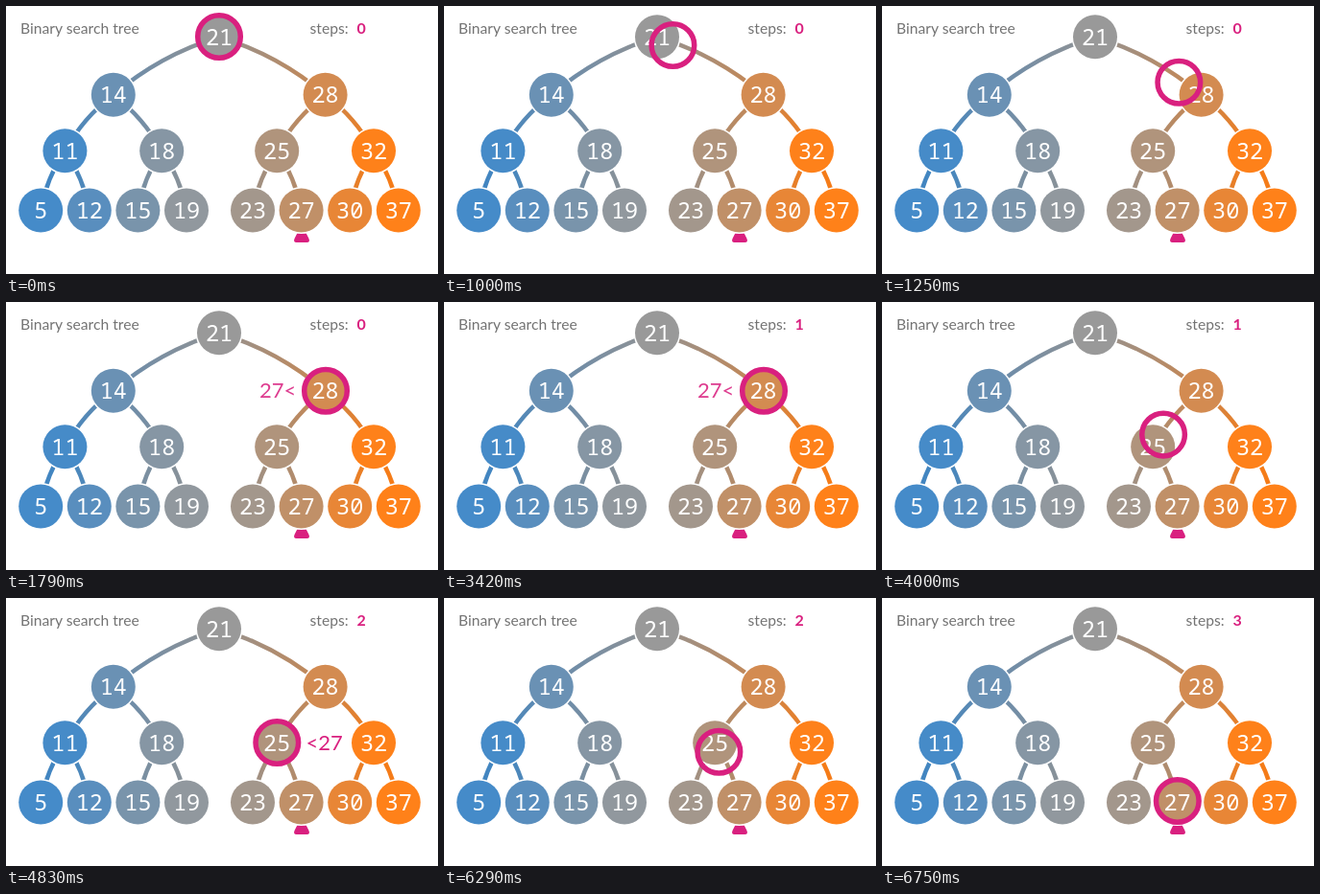
Write an HTML page that moves like this. It is 450x280 px and loops after 8000 ms.

```html
<!DOCTYPE html>
<html lang="en">
<head>
<meta charset="utf-8">
<title>Binary search tree</title>
<style>
  html, body { margin: 0; width: 100%; height: 100%; overflow: hidden; background: #fff; }
  svg { display: block; width: 450px; height: 280px; }
  text { font-family: Lato, sans-serif; }
  .label { font-size: 15.7px; fill: #737373; }
  .count { font-size: 16px; font-weight: 700; fill: #d9207f; }
  .hint { font-size: 22px; fill: #d9207f; }
  .num { font: 23.5px "Noto Sans Mono", monospace; fill: #fff; text-anchor: middle; }
  .ring { fill: none; stroke: #d9207f; stroke-width: 5.5; }
</style>
</head>
<body>
<svg id="stage" viewBox="0 0 450 280">
  <defs id="defs"></defs>
  <text class="label" x="15" y="29">Binary search tree</text>
  <text class="label" x="316.5" y="29">steps:</text>
  <text class="count" id="count" x="365.5" y="29">0</text>
  <g id="edges" fill="none" stroke-width="4.5"></g>
  <path fill="#d9207f" d="M308 231.5Q310 231.5 312 236L315.5 243Q317 247 313.5 247H302.5Q299 247 300.5 243L304 236Q306 231.5 308 231.5Z"/>
  <g id="nodes"></g>
  <text class="hint" id="less" x="264" y="100">27&lt;</text>
  <text class="hint" id="more" x="312.5" y="158.5">&lt;27</text>
  <circle class="ring" id="ring" r="22.3"/>
</svg>
<script>
const $ = id => document.getElementById(id);

function add(parent, tag, attrs, text) {
  const el = document.createElementNS('http://www.w3.org/2000/svg', tag);
  for (const k in attrs) el.setAttribute(k, attrs[k]);
  if (text !== undefined) el.textContent = text;
  $(parent).appendChild(el);
  return el;
}

// Level-order values; children of i are 2i+1 and 2i+2.
const values = [21, 14, 28, 11, 18, 25, 32, 5, 12, 15, 19, 23, 27, 30, 37];
const rowY = [32.3, 92.8, 151.3, 213.5];
const GREY = [153, 153, 153], BLUE = [69, 139, 201], ORANGE = [255, 129, 25];

function colour(x, shade = 1) {
  const end = x < 222 ? BLUE : ORANGE;
  const t = Math.min(1, Math.abs(x - 222) / 162) ** 1.5;
  return `rgb(${GREY.map((c, i) => Math.round((c + (end[i] - c) * t) * shade))})`;
}

const nodes = values.map((value, i) => {
  const row = Math.floor(Math.log2(i + 1));
  const col = i + 1 - 2 ** row;
  const slot = (2 * col + 1) * 2 ** (3 - row) - 1;
  const step = row === 3 ? 25.3 : 25.2;
  // The two halves of the tree stand a little apart.
  const x = slot === 7 ? 222 : slot < 7 ? 36.2 + slot * step : 257 + (slot - 8) * step;
  return { value, x, y: rowY[row] };
});

nodes.forEach((n, i) => {
  if (!i) return;
  const p = nodes[(i - 1) >> 1];
  const dx = n.x - p.x, dy = n.y - p.y;
  const side = dx < 0 ? 1 : -1;
  const cx = (p.x + n.x) / 2 - dy * 0.105 * side;
  const cy = (p.y + n.y) / 2 + dx * 0.105 * side;
  const grad = add('defs', 'linearGradient', {
    id: 'g' + i, gradientUnits: 'userSpaceOnUse', x1: p.x, y1: p.y, x2: n.x, y2: n.y
  });
  [p, n].forEach((end, k) => add(grad.id, 'stop', { offset: k, 'stop-color': colour(end.x, 0.96) }));
  add('edges', 'path', { d: `M${p.x} ${p.y}Q${cx} ${cy} ${n.x} ${n.y}`, stroke: `url(#g${i})` });
});

nodes.forEach(n => {
  add('nodes', 'circle', { cx: n.x, cy: n.y, r: 24.5, fill: '#fff' });
  add('nodes', 'circle', { cx: n.x, cy: n.y, r: 23, fill: colour(n.x) });
  add('nodes', 'text', { class: 'num', x: n.x, y: n.y + 8.6 }, n.value);
});

const FPS = 24, LOOP = 8000;
const stops = [[222, 32], [333, 92.7], [282.3, 151], [307.8, 212]];
const moves = [[23, 13], [89, 13], [150, 12]];  // start, length in ticks
const counts = [44, 102, 162];

const ramp = (n, start, len) => Math.max(0, Math.min(1, (n - start) / len));
const easeOut = t => 1 - (1 - t) ** 2;

function draw(time) {
  const n = Math.floor((time % LOOP + 5) * FPS / 1000) % (LOOP * FPS / 1000);
  let [x, y] = stops[0];
  moves.forEach(([start, len], i) => {
    const t = easeOut(ramp(n, start, len));
    x += (stops[i + 1][0] - stops[i][0]) * t;
    y += (stops[i + 1][1] - stops[i][1]) * t;
  });
  $('ring').setAttribute('cx', x);
  $('ring').setAttribute('cy', y);
  $('count').textContent = counts.filter(c => n >= c).length;
  $('less').style.opacity = ramp(n, 36, 8) - ramp(n, 81, 8);
  $('more').style.opacity = ramp(n, 111, 5) - ramp(n, 137, 5);
}

const t0 = performance.now();
function tick() {
  draw(performance.now() - t0);
  requestAnimationFrame(tick);
}
tick();
</script>
</body>
</html>
```
